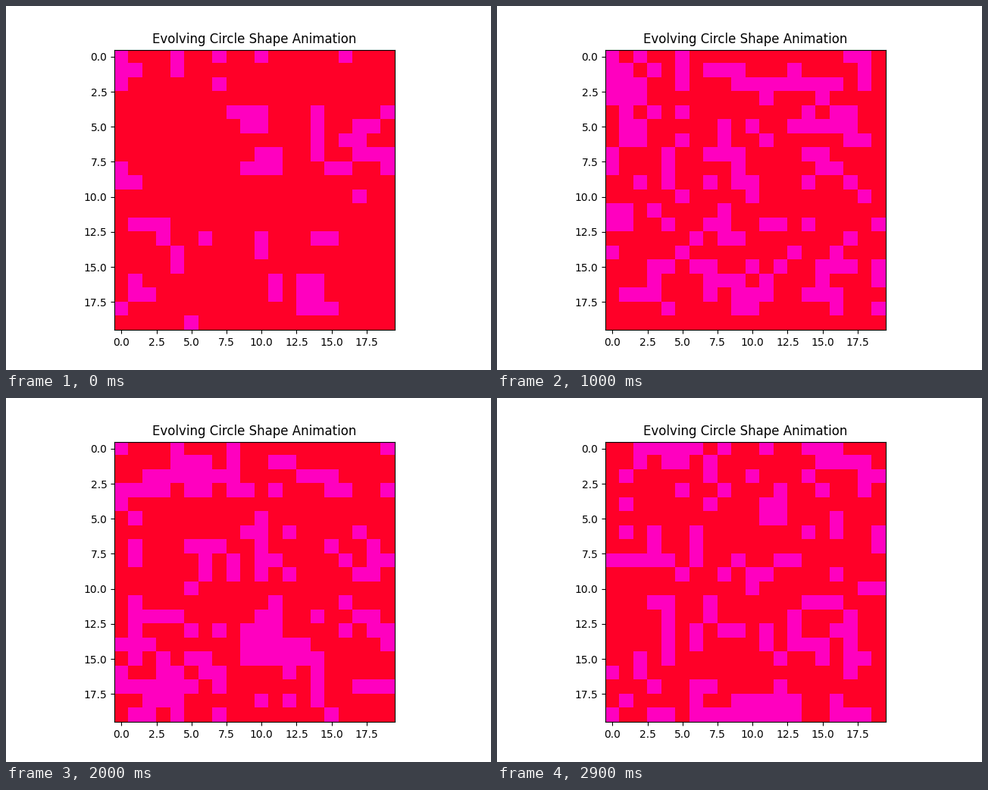
A matplotlib script for the animation above (3000 ms loop, 640 px wide and 480 px high).

```python
import numpy as np
import matplotlib.pyplot as plt
from matplotlib.animation import FuncAnimation

SIZE = 20
FRAMES = 30
INTERVAL = 100
CLUSTERING = 0.12


def density(frame):
    """Share of lit cells: sparse at the start, then settling near a third."""
    return 0.32 - 0.16 * np.exp(-0.7 * frame) + 0.015 * np.sin(1.9 * frame)


def cells(frame):
    """Loosely clustered random cells on a wrapped grid."""
    noise = np.random.default_rng(100 + frame).random((SIZE, SIZE))
    near = sum(np.roll(noise, step, axis) for step in (-1, 1) for axis in (0, 1))
    score = noise + CLUSTERING * near
    return (score > np.quantile(score, 1 - density(frame))).astype(float)


fig, ax = plt.subplots(figsize=(6.4, 4.8), dpi=100)
image = ax.imshow(cells(0), cmap="gist_rainbow", vmin=0, vmax=1)
ax.set_title("Evolving Circle Shape Animation")


def update(frame):
    image.set_data(cells(frame))
    return [image]


anim = FuncAnimation(fig, update, frames=FRAMES, interval=INTERVAL,
                     repeat=True, repeat_delay=0)
plt.show()
```
